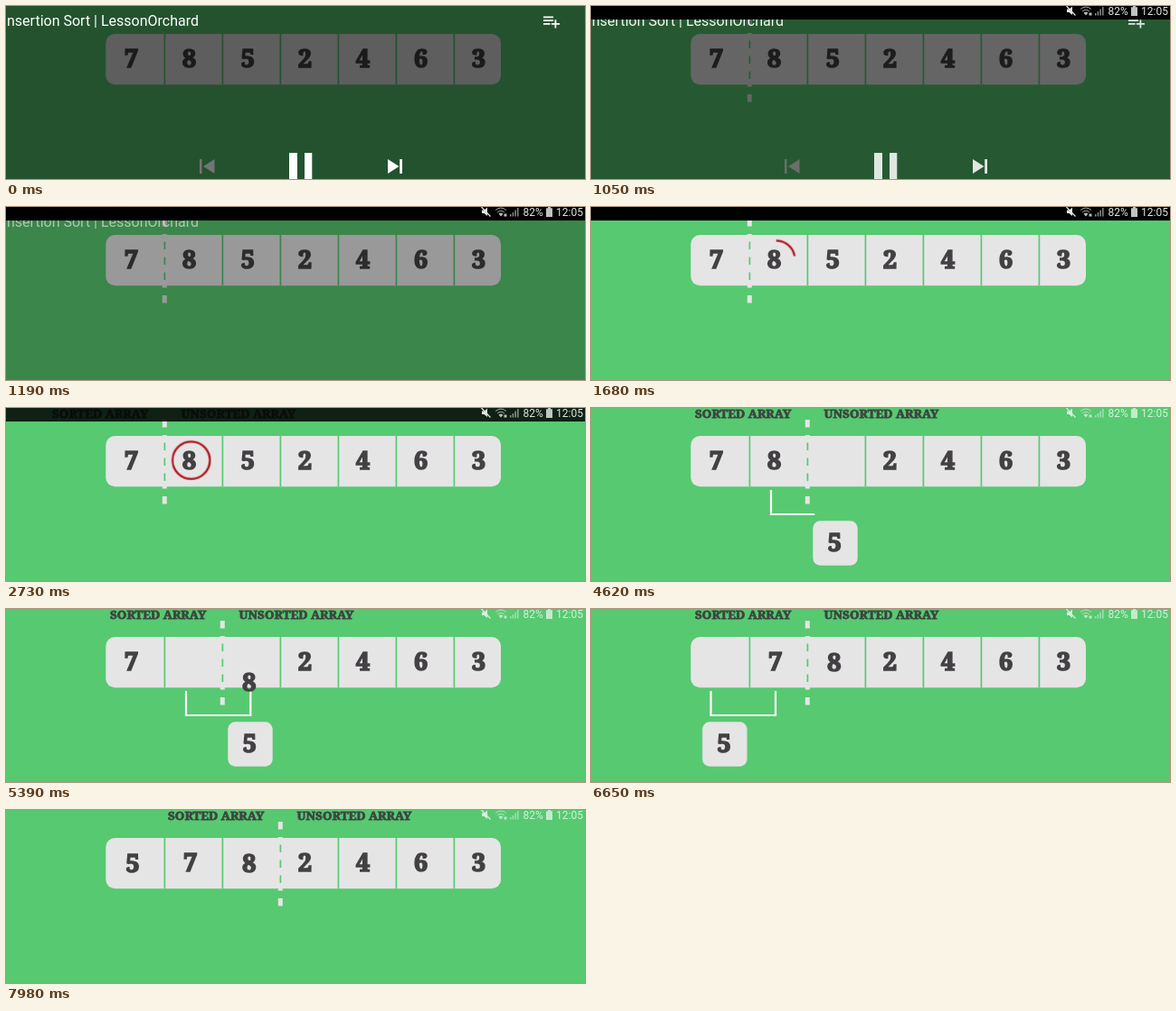
These frames come from a looping animation (640x192 px, 8 s). An HTML page:

```html
<!DOCTYPE html>
<html lang="en">
<head>
<meta charset="utf-8">
<title>Insertion Sort</title>
<style>
  html, body { margin: 0; width: 100%; height: 100%; overflow: hidden; background: #57c971; }
  svg { display: block; width: 640px; height: 192px; }
  .ui { font: 16px Roboto, sans-serif; fill: #fff; }
  .clock { font-size: 12px; }
  .digit { font: 900 27px "Noto Serif", serif; text-anchor: middle; fill: #444144; stroke: #444144; stroke-width: 1.7; }
  .label { font: 700 13.4px "Noto Serif", serif; fill: #3c4540; stroke: #3c4540; stroke-width: .8; }
  .draw { fill: none; stroke-dasharray: 1 2; }
  .bracket { stroke: #fff; stroke-width: 2.2; }
</style>
</head>
<body>
<svg viewBox="0 0 640 192">
  <rect width="640" height="192" fill="#57c971"/>
  <rect x="110.3" y="31" width="436.7" height="56.3" rx="10" fill="#e5e5e5"/>
  <g id="dividers" stroke="#57c971" stroke-width="1.7"></g>

  <g id="marker">
    <path d="M175.3 13V107" stroke="#e5e5e5" stroke-width="5" stroke-dasharray="8.6 8.4"/>
    <text class="label" x="51" y="10.5">SORTED ARRAY</text>
    <text class="label" x="193.5" y="10.5">UNSORTED ARRAY</text>
  </g>

  <circle id="ring" class="draw" cx="204.7" cy="58" r="20.7" pathLength="1" stroke="#b0141c" stroke-width="2.3" transform="rotate(-90 204.7 58)"/>
  <path id="bracket1" class="draw bracket" pathLength="1" d="M199 91V118H270.3V91"/>
  <path id="bracket2" class="draw bracket" pathLength="1" d="M132.5 91V118H204V91"/>

  <g id="carrier"><g id="tile"><rect x="-24.7" y="-24.7" width="49.4" height="49.4" rx="8" fill="#e5e5e5"/></g></g>
  <g id="digits"></g>

  <rect id="shade" width="640" height="192" opacity=".59"/>
  <text id="title" class="ui" x="1" y="21.5">nsertion Sort | LessonOrchard</text>
  <g id="controls" fill="#fff">
    <path d="M594 11.500h11v1.800h-11zM594 15.200h11v1.800h-11zM594 18.900h7.500v1.800h-7.500zM606.500 15.200h1.800v3.700h3.700v1.800h-3.700v3.700h-1.800v-3.700h-3.700v-1.800h3.700z"/>
    <path d="M214 170h2.500v16H214zM230.500 170v16L218 178z" fill="#747474"/>
    <path d="M313 163h9v29h-9zM330 163h8.300v29h-8.300z"/>
    <path d="M422 170v16l12.500-8zM435.200 170h2.800v16h-2.800z"/>
  </g>

  <g id="bar">
    <rect id="barFill" width="640" height="15"/>
    <g id="icons" class="ui clock">
      <path d="M526 3.500h2.500l3.500-3v9.500l-3.500-3H526z"/>
      <path d="M525.500 0l10 10.500" stroke="#fff" stroke-width="1.200"/>
      <path d="M541 3.500q6-5 12 0M543 6q4-3.500 8 0" fill="none" stroke="#fff" opacity=".7"/>
      <path d="M544.500 7.500q2.500-2 5 0l-2.500 3zM550.500 7.500h3v3h-3z" opacity=".8"/>
      <path d="M557 8h1.500v2.500H557zM559.700 6h1.500v4.500h-1.500zM562.400 3.500h1.500v7h-1.500zM565.100 1h1.500v9.500h-1.500z" opacity=".6"/>
      <text x="571.500" y="10">82%</text>
      <path d="M599 0h3v1.200h2V11h-7V1.200h2z" opacity=".85"/>
      <text x="608" y="10">12:05</text>
    </g>
  </g>
</svg>
<script>
const LOOP = 8000, STEP = 70;
const NS = "http://www.w3.org/2000/svg";
const $ = id => document.getElementById(id);
const EASE = "cubic-bezier(.45,0,.55,1)", OUT = "ease-out";
const at = (x, y) => `translate(${x}px, ${y}px)`;
const anims = [];

function add(parent, tag, attrs, text = "") {
  const el = document.createElementNS(NS, tag);
  for (const k in attrs) el.setAttribute(k, attrs[k]);
  el.textContent = text;
  return parent.appendChild(el);
}

// Each step is [time, value, easing towards the next step].
function track(el, prop, steps) {
  const rows = [[0, steps[0][1]], ...steps, [LOOP, steps.at(-1)[1]]];
  const frames = rows.map(([t, v, easing = "linear"]) => ({ offset: t / LOOP, [prop]: v, easing }));
  const a = el.animate(frames, { duration: LOOP, fill: "both" });
  a.pause();
  anims.push(a);
}

for (let i = 1; i < 7; i++) add($("dividers"), "path", { d: `M${111.4 + 64 * i} 31v56.3` });

const digits = {};
[7, 8, 5, 2, 4, 6, 3].forEach((n, i) => {
  const g = digits[n] = add($("digits"), "g", {});
  add(g, "text", { class: "digit", y: 9.7 }, n);
  g.style.transform = at(138.5 + 64 * i, 58);
});

// Player overlay and status bar
track($("bar"), "transform", [[0, at(0, -15)], [280, at(0, 0)]]);
track($("barFill"), "opacity", [[2675, 1], [3010, 0]]);
track($("icons"), "opacity", [[2675, .9], [3010, .75]]);
track($("shade"), "opacity", [[1030, .59], [1400, 0]]);
track($("title"), "opacity", [[1030, 1], [1400, 0]]);
track($("controls"), "opacity", [[1030, 1], [1170, 0]]);

// Border between the sorted and unsorted parts
track($("marker"), "opacity", [[280, 0], [700, 1]]);
track($("marker"), "transform", [
  [3150, at(0, 0), EASE], [3500, at(64, 0)], [7700, at(64, 0), EASE], [7980, at(128, 0)]
]);

track($("ring"), "strokeDashoffset", [[1540, 1, EASE], [1960, 0]]);
track($("ring"), "opacity", [[1540, 0], [1541, 1], [2730, 1], [2940, 0]]);

function bracket(el, start, drawn, fade, gone) {
  track(el, "strokeDashoffset", [[start, 1], [drawn, 0]]);
  track(el, "opacity", [[start, 0], [start + 1, 1], [fade, 1], [gone, 0]]);
}
bracket($("bracket1"), 4410, 4760, 5670, 5780);
bracket($("bracket2"), 5700, 5900, 6700, 6850);

// Moves a digit down, across and up at constant speed.
function shift(el, x0, x1, y1, start, end) {
  const low = 118, legs = [low - 58, x1 - x0, low - y1];
  const unit = (end - start) / (legs[0] + legs[1] + legs[2]);
  const t1 = start + legs[0] * unit, t2 = t1 + legs[1] * unit;
  track(el, "transform", [[start, at(x0, 58)], [t1, at(x0, low)], [t2, at(x1, low)], [end, at(x1, y1)]]);
}
shift(digits[8], 202.5, 268.9, 59.5, 4800, 5470);
shift(digits[7], 138.5, 203.9, 58, 5880, 6420);

// The key and its tile
const slide = (y, dx = 0) => [
  [5480, at(270 + dx, y), EASE], [5760, at(205 + dx, y)],
  [6440, at(205 + dx, y), EASE], [6720, at(140 + dx, y)]
];
track($("carrier"), "transform", slide(150));
track($("tile"), "transform", [
  [3710, "scale(0)"], [3780, "scale(.41)", OUT], [3920, "scale(1)"],
  [7210, "scale(1)", EASE], [7490, "scale(0)"]
]);
track(digits[5], "transform", [
  [3850, at(267.3, 58), EASE], [4200, at(269.2, 149.5)],
  ...slide(149.5, -.8),
  [6860, at(139.2, 149.5), EASE], [7280, at(140, 59)]
]);

function draw() {
  const t = performance.now() % LOOP;
  const now = Math.floor(t / STEP) * STEP;
  for (const a of anims) a.currentTime = now;
  requestAnimationFrame(draw);
}
draw();
</script>
</body>
</html>
```
